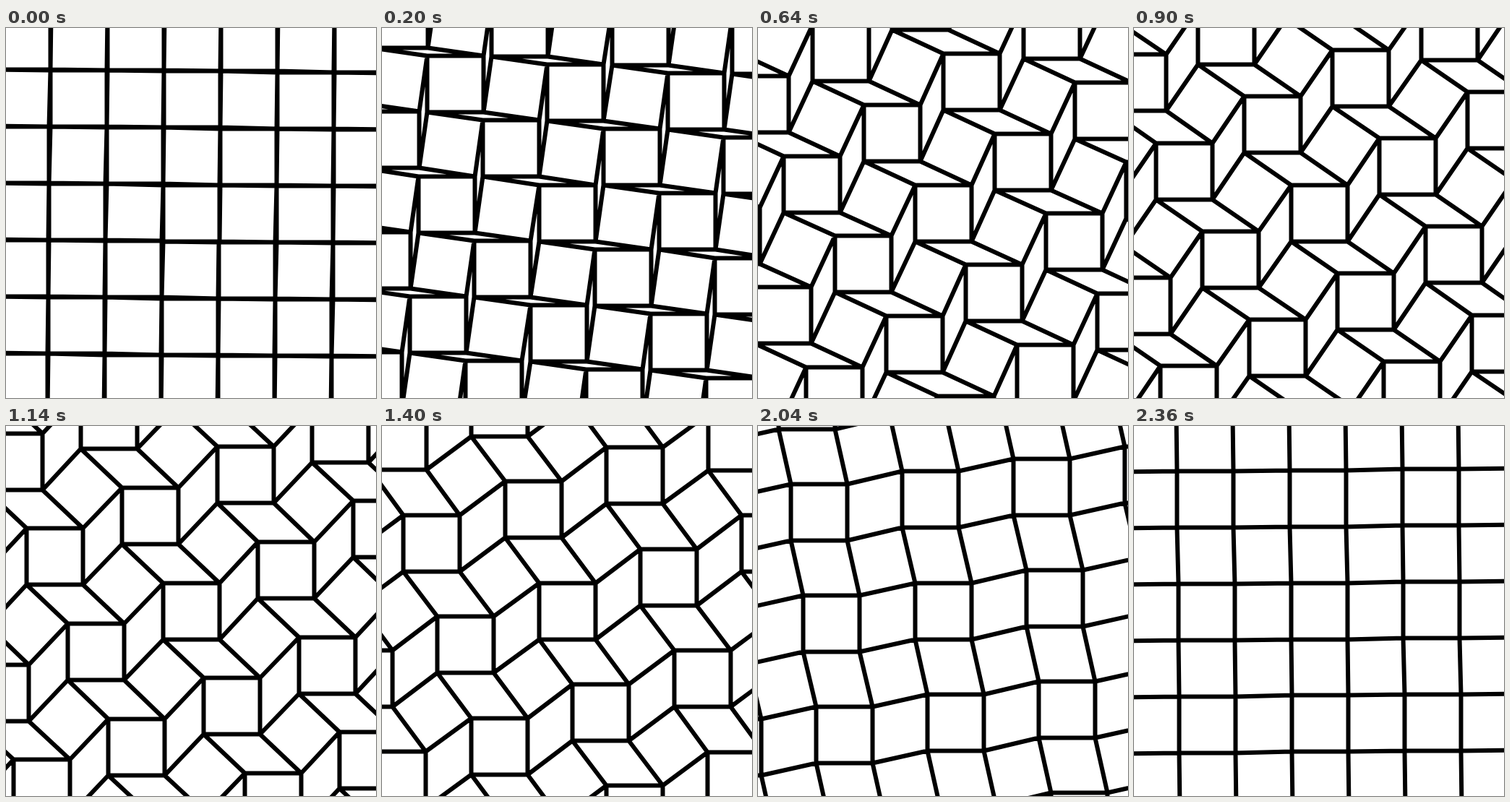
An HTML page with a canvas that plays this animation: 512x512 px, repeating every 2380 ms.

```html
<!DOCTYPE html>
<html>
<head>
<meta charset="utf-8">
<style>
  html, body { margin: 0; height: 100%; overflow: hidden; background: #fff; }
  canvas { display: block; }
</style>
</head>
<body>
<canvas width="512" height="512"></canvas>
<script>
const ctx = document.querySelector('canvas').getContext('2d');
const SIDE = 78, CORNER = 217.5, REACH = 6;
const STEP = 20, STEPS = 119;
ctx.lineWidth = 6;
ctx.lineCap = ctx.lineJoin = 'round';

function edge(x1, y1, x2, y2) {
  ctx.moveTo(x1, y1);
  ctx.lineTo(x2, y2);
}

// Upright squares joined by hinged edges that turn from 0 to 90 degrees
function draw(angle) {
  const c = SIDE * Math.cos(angle), s = SIDE * Math.sin(angle);
  // Top left corner of a square, snapped to whole pixels
  const corner = (i, j) => [
    CORNER + Math.floor(i * (SIDE + s) + j * c),
    CORNER + Math.floor(j * (SIDE + s) - i * c)
  ];
  ctx.fillStyle = '#fff';
  ctx.fillRect(0, 0, 512, 512);
  ctx.beginPath();
  for (let i = -REACH; i <= REACH; i++) {
    for (let j = -REACH; j <= REACH; j++) {
      const [x, y] = corner(i, j);
      const [acrossX, acrossY] = corner(i + 1, j);
      const [belowX, belowY] = corner(i, j + 1);
      ctx.rect(x, y, SIDE, SIDE);
      edge(x, y + SIDE, belowX, belowY);
      edge(x + SIDE, y + SIDE, belowX + SIDE, belowY);
      edge(x + SIDE, y, acrossX, acrossY);
      edge(x + SIDE, y + SIDE, acrossX, acrossY + SIDE);
    }
  }
  ctx.stroke();
}

const start = performance.now();
function tick() {
  const step = Math.floor((performance.now() - start) / STEP + 0.01) % STEPS;
  draw((step + 1) / (STEPS + 1) * Math.PI / 2);
  requestAnimationFrame(tick);
}
tick();
</script>
</body>
</html>
```
